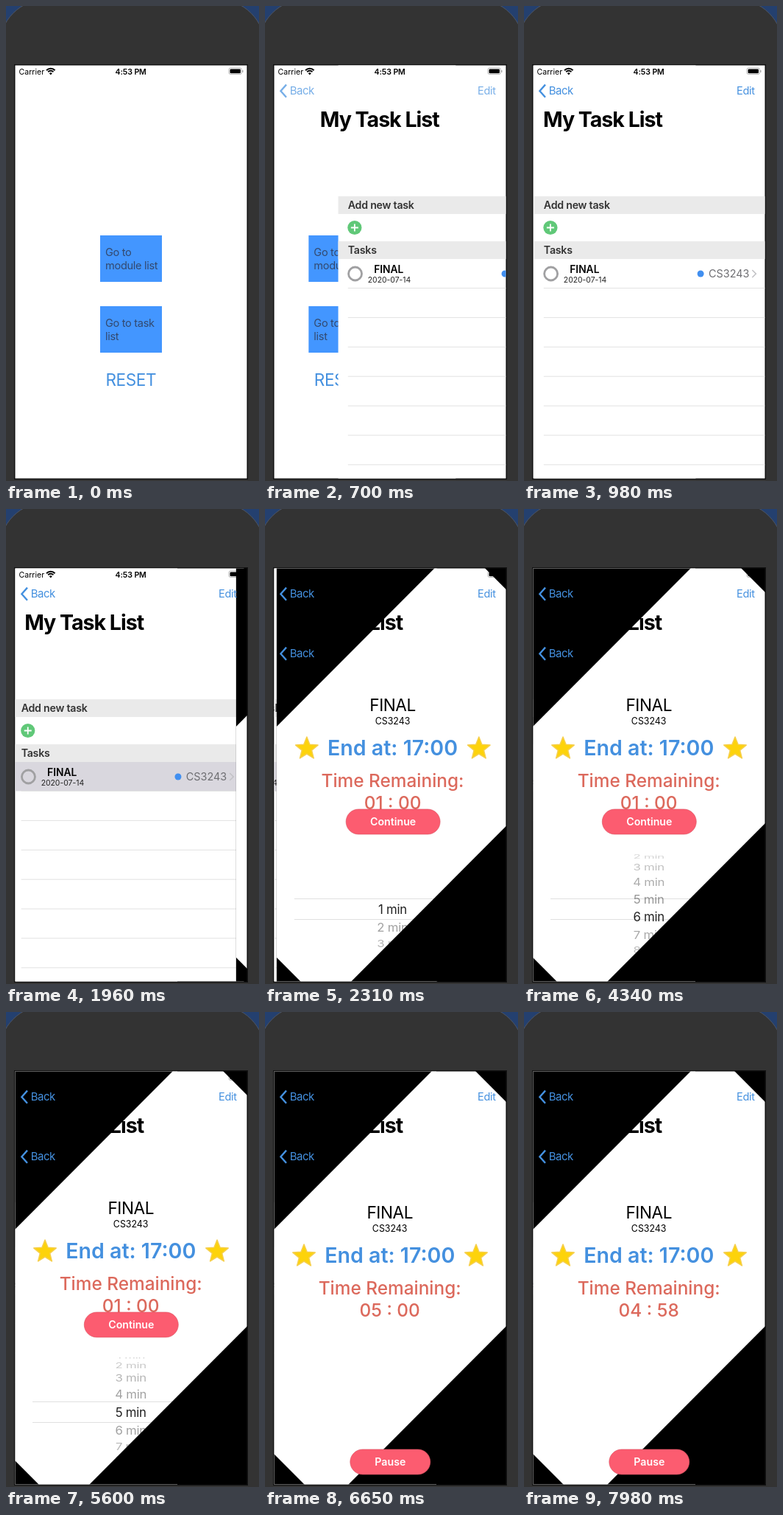
An HTML page for the animation above (8000 ms loop, 344x644 px).

```html
<!DOCTYPE html>
<html lang="en">
<head>
<meta charset="utf-8">
<title>Task timer</title>
<style>
html, body { margin: 0; height: 100%; overflow: hidden; background: #333; }
svg { display: block; width: 100vw; height: 100vh; font-family: Inter, Roboto, sans-serif; }
</style>
</head>
<body>
<svg id="stage" viewBox="0 0 344 644"></svg>
<script>
const BLUE = '#4490df', RED = '#dc695c', PINK = '#fc5c70';

const text = (x, y, size, str, o = {}) =>
  `<text x="${x}" y="${y}" font-size="${size}" font-weight="${o.w || 400}" fill="${o.c || '#000'}"
    text-anchor="${o.a || 'start'}" letter-spacing="${o.s || 0}em" ${o.id ? `id="${o.id}"` : ''}>${str}</text>`;
const rect = (x, y, w, h, fill, more = '') =>
  `<rect x="${x}" y="${y}" width="${w}" height="${h}" fill="${fill}" ${more}/>`;
const mid = (y, size, str, o) => text(169.7, y, size, str, { a: 'middle', ...o });

const backLink = (y, id) => `<g id="${id}">
  <path d="M29 ${y - 8.4}l-7.6 8.6 7.6 8.6" fill="none" stroke="${BLUE}" stroke-width="2.4"/>
  ${text(33.8, y + 5.4, 15, 'Back', { c: BLUE, s: -.035 })}</g>`;

const homeButton = (y, a, b) => rect(128, y, 84, 63, '#4396ff') +
  text(135, y + 27.5, 14.6, a, { c: '#33496f', s: -.022 }) +
  text(135, y + 46, 14.6, b, { c: '#33496f', s: -.022 });

const star = cx => {
  const pts = Array.from({ length: 10 }, (_, i) => {
    const r = i % 2 ? 7 : 16, a = i * Math.PI / 5;
    return [cx + r * Math.sin(a), 325 - r * Math.cos(a)].map(v => v.toFixed(1));
  });
  return `<polygon points="${pts.join(' ')}" fill="#fdd30b" stroke="#f6cf4c" stroke-width="1.5" stroke-linejoin="round"/>`;
};

const section = (y, str) => rect(12, y, 316, 24, '#eaeaea') +
  text(25.2, y + 17, 14.2, str, { w: 600, c: '#333', s: -.017 });

const lines = Array.from({ length: 7 }, (_, i) =>
  rect(25.2, 382 + i * 39.9, 303, 1, '#e2e2e2')).join('');

const wifi = [2, 5, 8].map((r, i) => {
  const d = r * .72;
  return i ? `<path d="M${60.8 - d} ${93 - d}a${r} ${r} 0 0 1 ${2 * d} 0" fill="none" stroke="#000" stroke-width="2"/>`
    : '<path d="M60.8 93.4l-2-2.2a3 3 0 0 1 4 0z"/>';
}).join('');

stage.innerHTML = `
<clipPath id="screen">${rect(12.5, 80.4, 315, 560.2, '#000')}</clipPath>
<clipPath id="drum">${rect(12, 468, 316, 140, '#000')}</clipPath>
${rect(0, 0, 344, 644, '#24406f')}
<rect x="-9" y="-9" width="361" height="700" rx="64" fill="#333" stroke="#4f5561"/>
${rect(11, 79, 318, 563, '#111')}
<g clip-path="url(#screen)">
  <g id="home">
    ${rect(12, 80, 316, 561, '#fff')}
    ${homeButton(311, 'Go to', 'module list')}
    ${homeButton(407, 'Go to task', 'list')}
    ${text(135.5, 515, 22.6, 'RESET', { c: BLUE, s: -.02 })}
  </g>
  <g id="list">
    ${rect(12, 80, 316, 561, '#fff')}
    ${section(258, 'Add new task')}
    <circle cx="34.3" cy="300.5" r="9.6" fill="#60c878"/>
    <path d="M29.3 300.5h10m-5-5v10" stroke="#fff" stroke-width="1.8"/>
    ${section(319, 'Tasks')}
    <g id="row">${rect(12, 343, 316, 39.5, '#d9d7de')}</g>
    ${lines}
    <circle cx="35" cy="363" r="9" fill="none" stroke="#a0a0a2" stroke-width="2.8"/>
    ${text(60.6, 361.5, 13.8, 'FINAL', { w: 600 })}
    ${text(52.2, 375, 10.4, '2020-07-14', { c: '#222' })}
    <circle cx="238.5" cy="363" r="4.5" fill="#418ff0"/>
    ${text(249.4, 368, 14.4, 'CS3243', { c: '#6e6e72' })}
    <path d="M308.7 358l5 5-5 5" fill="none" stroke="#c2c2c6" stroke-width="1.6"/>
  </g>
  <g id="timer">
    ${rect(12, 80, 316, 561, '#000')}
    <polygon id="sheet" fill="#fff"/>
    <g id="info">
      ${mid(274, 22.6, 'FINAL', { s: -.02 })}
      ${mid(292, 12.4, 'CS3243')}
      ${star(53)}${star(287)}
      ${mid(333.5, 28.6, 'End at: 17:00', { w: 600, c: BLUE })}
      ${mid(377, 24.4, 'Time Remaining:', { w: 500, c: RED })}
      ${mid(407, 24.4, '', { w: 500, c: RED, id: 'clock' })}
    </g>
    <g id="picker">
      ${rect(36, 528, 268, 1, '#000', 'opacity=".12"')}
      ${rect(36, 556, 268, 1, '#000', 'opacity=".12"')}
      <g id="wheel" clip-path="url(#drum)"></g>
    </g>
    <g id="button">
      <rect id="pill" y="-17" height="34" rx="17" fill="${PINK}" stroke="#d8505f" stroke-width=".6"/>
      ${text(0, 5, 14.2, '', { w: 600, c: '#fff', a: 'middle', id: 'label' })}
    </g>
  </g>
  ${text(25.2, 164, 28.6, 'My Task List', { w: 700, s: -.036, id: 'title' })}
  <g id="bar">
    ${backLink(115, 'back')}
    ${text(289, 120.4, 14.6, 'Edit', { c: BLUE, s: -.025 })}
  </g>
  ${backLink(196, 'back2')}
  ${text(17.5, 92.5, 10.6, 'Carrier')}
  ${wifi}
  ${mid(92.5, 10.6, '4:53 PM', { w: 600, s: -.01 })}
  <rect x="303" y="84" width="17.5" height="8.6" rx="2.4" fill="none" stroke="#000" stroke-opacity=".35" stroke-width=".8"/>
  ${rect(304.5, 85.4, 14.5, 5.8, '#000', 'rx="1.3"')}
  ${rect(321.3, 87, 1.2, 3, '#000', 'opacity=".35"')}
</g>`;

const $ = id => document.getElementById(id);
const set = (id, name, v) => $(id).setAttribute(name, v);
const move = (id, x, y = 0) => set(id, 'transform', `translate(${x} ${y})`);
const ease = (t, a, b) => {
  const p = Math.min(1, Math.max(0, (t - a) / (b - a)));
  return p * p * (3 - 2 * p);
};
// Critically damped push: 1 before the start, settling to 0
const push = (t, start) => {
  const k = Math.max(0, t - start) * .01735;
  return (1 + k) * Math.exp(-k);
};

function drawWheel(pos) {
  let out = '';
  for (let n = 1; n <= 12; n++) {
    const a = (n - pos) * .32, far = Math.abs(n - pos);
    if (Math.abs(a) > 1.4) continue;
    const alpha = far < .5 ? .87 : Math.max(.1, .45 - far * .08);
    out += `<g transform="translate(169.7 ${543 + 78 * Math.sin(a)}) scale(1 ${Math.cos(a)})" opacity="${alpha}">
      <text y="6" font-size="16.8" letter-spacing="-.015em" text-anchor="middle">${n} min</text></g>`;
  }
  $('wheel').innerHTML = out;
}

function draw(t) {
  const a = push(t, 554), b = push(t, 1941);
  move('home', -95 * (1 - a));
  move('list', 316 * a - 95 * (1 - b));
  move('title', 316 * push(t, 510));
  set('bar', 'opacity', 1 - a);
  set('row', 'opacity', t < 1820 ? 0 : 1);
  move('timer', 316 * b);
  set('back2', 'opacity', Math.max(0, 1 - 1.1 * b));

  const run = ease(t, 5880, 6230), c = 33 + 9 * run;
  set('sheet', 'points', `12,295 227,80 ${328 - c},80 328,${80 + c} 328,426 113,641 ${12 + c},641 12,${641 - c}`);
  move('info', 0, 6 * run);
  set('picker', 'opacity', 1 - run);
  drawWheel(1 + 5 * ease(t, 3220, 3500) - ease(t, 4130, 4600));

  const w = 128 - 19 * run;
  move('button', 170.3, 424 + 186 * run);
  set('pill', 'x', -w / 2);
  set('pill', 'width', w);
  $('label').textContent = t < 5880 ? 'Continue' : 'Pause';
  $('clock').textContent = t < 5880 ? '01 : 00' : t < 6930 ? '05 : 00' : t < 7910 ? '04 : 59' : '04 : 58';
}

const begin = performance.now();
(function tick() {
  draw((performance.now() - begin) % 8000);
  requestAnimationFrame(tick);
})();
</script>
</body>
</html>
```
